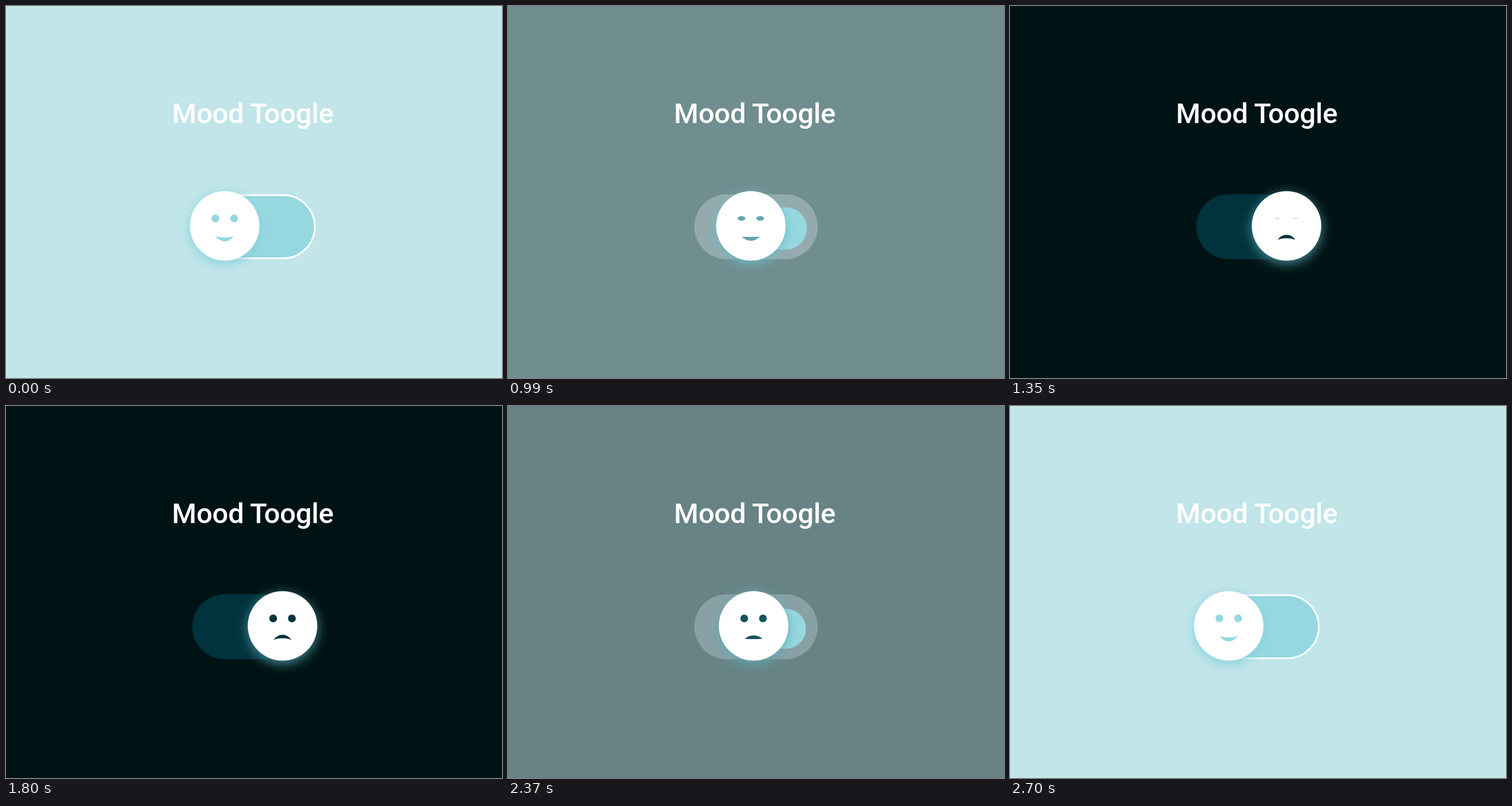
Animation of 864 by 648 pixels, one loop 3.03 s. Source, as an HTML page:

```html
<!DOCTYPE html>
<html lang="en">
<head>
<meta charset="utf-8">
<title>Mood Toogle</title>
<style>
  html, body { margin: 0; width: 100%; height: 100%; overflow: hidden; }
  svg { display: block; width: 864px; height: 648px; }
  text { font: 500 49px Roboto, sans-serif; letter-spacing: -.25px; fill: #fff; }
</style>
</head>
<body>
<svg viewBox="0 0 864 648">
  <defs>
    <filter id="blur" x="-50%" y="-50%" width="200%" height="200%">
      <feGaussianBlur stdDeviation="10"/>
    </filter>
  </defs>
  <text x="289" y="203.5">Mood Toogle</text>
  <rect id="track" x="324.5" y="328" width="215" height="113" rx="56.5"/>
  <rect id="fill" fill="#96d8e0"/>
  <g id="knob">
    <circle id="shadow" cy="388" r="60.5" filter="url(#blur)"/>
    <circle cy="383" r="60.5" fill="#fff"/>
    <g id="face">
      <ellipse class="eye" cx="-16.3" cy="370" rx="6.8"/>
      <ellipse class="eye" cx="16.3" cy="370" rx="6.8"/>
      <path id="mouth"/>
    </g>
  </g>
</svg>
<script>
const LOOP = 3030, STEP = 30;
const TO_DARK = 905, OPEN_EYES = 1518, TO_LIGHT = 2270;
const $ = id => document.getElementById(id);
const eyes = document.querySelectorAll('.eye');

const lerp = (a, b, p) => a + (b - a) * p;
const mixColor = (a, b, p) => `rgb(${a.map((v, i) => Math.round(lerp(v, b[i], p)))})`;
const ease = (t, start, duration) => {
  const x = Math.min(1, Math.max(0, (t - start) / duration));
  return x * x * (3 - 2 * x);
};
const set = (el, attrs) => {
  for (const name in attrs) el.setAttribute(name, attrs[name]);
};

function draw(t) {
  // 0 is the light mood, 1 the dark one; each layer has its own pace
  const mood = (darken, lighten = darken) =>
    ease(t, TO_DARK, darken) - ease(t, TO_LIGHT, lighten);
  const slide = mood(191), smile = mood(300), tint = mood(230, 360), glow = mood(220);
  const shut = ease(t, TO_DARK, 190) - ease(t, OPEN_EYES, 280);

  document.body.style.background = mixColor([193, 229, 233], [0, 19, 20], slide);
  set($('track'), { fill: mixColor([255, 255, 255], [0, 51, 61], slide) });

  const left = lerp(327.5, 473, slide), right = lerp(536.5, 499, slide);
  const top = lerp(331, 379, slide), bottom = lerp(438, 405, slide);
  set($('fill'), {
    x: left, y: top, width: right - left, height: bottom - top, rx: (bottom - top) / 2
  });

  set($('knob'), { transform: `translate(${lerp(381, 481.7, slide)} 0)` });
  set($('shadow'), { fill: mixColor([130, 208, 220], [70, 140, 150], glow) });
  set($('face'), { fill: mixColor([150, 216, 224], [0, 51, 61], tint) });
  eyes.forEach(eye => set(eye, { ry: lerp(6.8, .15, shut) }));

  const corner = lerp(400.5, 407.5, smile);
  const upper = lerp(404, 395.5, smile), lower = lerp(413.2, 403.5, smile);
  set($('mouth'), {
    d: `M-15.5 ${corner}C-7.5 ${upper} 7.5 ${upper} 15.5 ${corner}` +
       `C7.5 ${lower} -7.5 ${lower} -15.5 ${corner}Z`
  });
}

const origin = performance.now();
function tick() {
  const t = (performance.now() - origin) % LOOP;
  draw(Math.floor(t / STEP) * STEP);
  requestAnimationFrame(tick);
}
tick();
</script>
</body>
</html>
```
